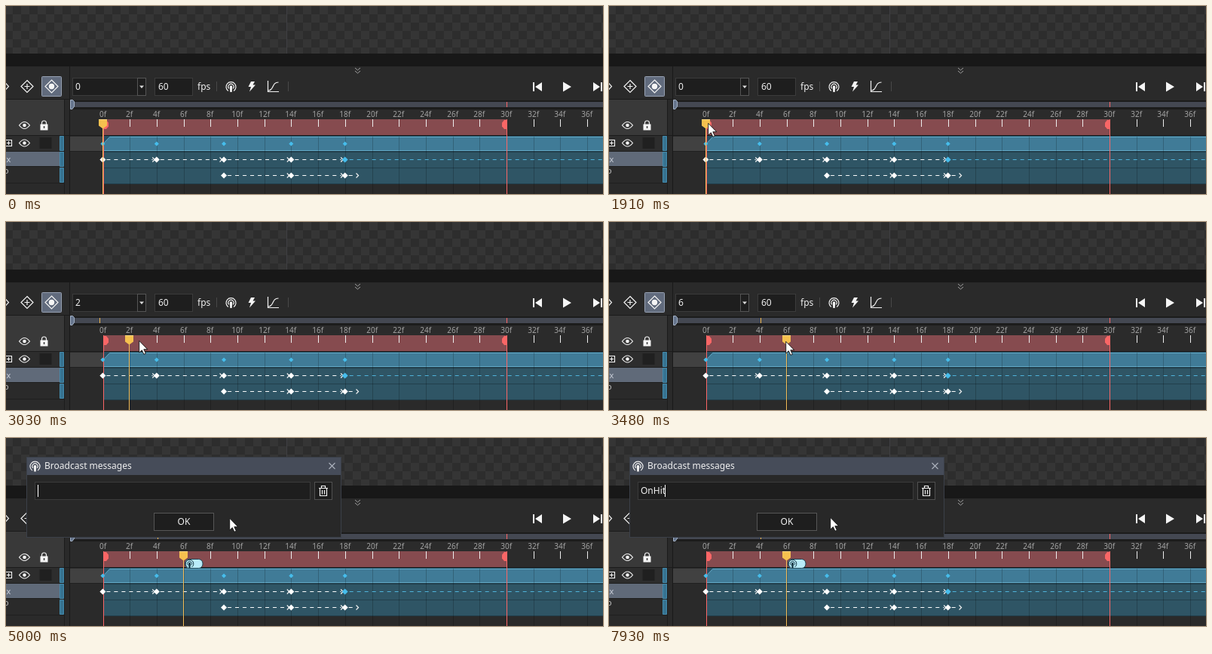
An HTML page for the animation above (8000 ms loop, 792x249 px).

```html
<!DOCTYPE html>
<html lang="en">
<head>
<meta charset="utf-8">
<title>Timeline broadcast</title>
<style>
  html, body { margin: 0; width: 100%; height: 100%; overflow: hidden; background: #2a2a2a; }
  svg { display: block; width: 792px; height: 249px; }
  text { font: 12px "Noto Sans", "Open Sans", sans-serif; fill: #f0f0f0; white-space: pre; }
  .ruler text { font-size: 10px; fill: #a2a2a2; text-anchor: middle; }
  .line { fill: none; stroke: #f2f2f2; stroke-width: 1.2; }
  .box { fill: #1e1e1e; stroke: #3b3b3b; }
</style>
</head>
<body>
<svg viewBox="0 0 792 249" xmlns="http://www.w3.org/2000/svg">
  <defs>
    <pattern id="checker" x="372" width="22" height="22" patternUnits="userSpaceOnUse">
      <path fill="#2d2d2d" d="M0 0h22v22H0z"/>
      <path fill="#353535" d="M0 0h11v11H0zM11 11h11v11H11z"/>
    </pattern>
    <g id="eye">
      <path class="line" d="M-7 0Q0-9 7 0Q0 9-7 0Z"/>
      <circle r="2.3" fill="#f2f2f2"/>
    </g>
    <g id="cast" fill="none" stroke="currentColor" stroke-width="1.2">
      <path d="M-3.6 5.5A6.5 6.5 0 1 1 3.6 5.5M-2.6 2.4A3.6 3.6 0 1 1 2.6 2.4"/>
      <path fill="currentColor" stroke="none" d="M-1.7 0a1.7 1.7 0 1 1 3.4 0l-.5 7h-2.4z"/>
    </g>
    <path id="limit" fill="#fa6666" d="M0 151h4l3 3.5v5L4 163H0z"/>
  </defs>

  <!-- canvas and toolbar -->
  <rect width="792" height="63" fill="url(#checker)"/>
  <path d="M372.5 0v63" stroke="#3f3f43"/>
  <rect y="63" width="792" height="17" fill="#181818"/>
  <rect y="80" width="792" height="45" fill="#2a2a2a"/>
  <path d="M463 82l3.5 3 3.5-3M463 86l3.5 3 3.5-3" fill="none" stroke="#a0a0a0"/>
  <path class="line" d="M-3 99.500l6.500 7-6.500 7M28 98.500l8 8-8 8-8-8zM28 103v7M24.500 106.500h7"/>
  <rect x="47.500" y="93.500" width="26" height="26" rx="1" fill="#616b7d" stroke="#97a1b2"/>
  <path class="line" d="M60.500 98l8.500 8.500-8.500 8.500-8.500-8.500z"/>
  <circle cx="60.500" cy="106.500" r="3.700" fill="#f5f5f5"/>
  <path d="M84.500 80v169" stroke="#191919"/>
  <rect class="box" x="88.500" y="95.500" width="86" height="23"/>
  <rect class="box" x="174.500" y="95.500" width="11" height="23" style="stroke:#555"/>
  <path d="M177 105.500h6l-3 3.500z" fill="#ddd"/>
  <rect class="box" x="197.500" y="95.500" width="50" height="23"/>
  <text id="count" x="92" y="111">0</text>
  <text x="202" y="111">60</text>
  <text x="254" y="111">fps</text>
  <path d="M279.500 100v13M374.500 100v13" stroke="#484848"/>
  <rect id="hover" x="286.500" y="96.500" width="23" height="21" fill="#3b3f48" stroke="#555c69"/>
  <use href="#cast" x="298.500" y="107" color="#f2f2f2"/>
  <path fill="#f5f5f5" d="M325 100h5l-2.500 4.500h3.500l-8 9 2-6.500h-3.500z"/>
  <path class="line" d="M347.500 99v14.500H362M348 112C356 112 352 101 361.500 101"/>
  <path fill="#f5f5f5" d="M699 101h2v12h-2zM711 101v12l-9-6zM739 100.500l11 6.500-11 6.500zM779 101l9 6-9 6zM789 101h2v12h-2z"/>

  <!-- layer list -->
  <rect y="124" width="77" height="48" fill="#393939"/>
  <path d="M0 123.500h84M0 171.500h84" stroke="#1b1b1b"/>
  <rect y="172" width="77" height="20" fill="#2d2d2d"/>
  <rect y="193" width="77" height="19" fill="#606a79"/>
  <path d="M0 192.500h77M0 212.500h77M0 234.500h77" stroke="#1f1f1f"/>
  <path d="M71.500 172.500h5v19h-5zM71.500 193.500h5v19h-5zM71.500 214.500h5v19h-5z" fill="#377391" stroke="#438aac"/>
  <path d="M77.500 124v125" stroke="#1c1c1c"/>
  <use href="#eye" x="24.500" y="158"/>
  <use href="#eye" x="24.500" y="181.500"/>
  <path class="line" d="M47.500 157v-2a3 3 0 0 1 6 0v2"/>
  <path fill="#f5f5f5" fill-rule="evenodd" d="M45.500 156.500h10v8h-10zM49.800 159v3h1.500v-3z"/>
  <path class="line" d="M-1 177.500h8.500v8H-1M3.500 179v5M1 181.500h5"/>
  <rect x="44.500" y="174" width="16" height="15" fill="#202020"/>
  <text x="-6" y="207" style="font-size:11px;fill:#c9ced8">ox</text>
  <text x="-3" y="222" style="font-size:11px;fill:#c0c0c0">o</text>

  <!-- time line -->
  <rect x="85" y="125" width="707" height="12" fill="#1c1c1c"/>
  <rect x="87" y="127" width="705" height="7" fill="#444852"/>
  <path d="M664.500 127v7" stroke="#fa6666"/>
  <path id="tick" d="M.5 127v7" stroke="#efb64c"/>
  <path d="M85.500 124.500h3l2 2v6.500l-2.500 3.500h-2.500z" fill="#66758d" stroke="#a3b1c4"/>
  <rect x="85" y="137" width="707" height="35" fill="#2b2b2b"/>
  <rect x="129" y="150" width="535" height="21" fill="#864b4f"/>
  <path d="M85 171.500h707" stroke="#1b1b1b"/>
  <rect x="85" y="173" width="44" height="19" fill="#414141"/>
  <path d="M85 192.500h44" stroke="#202020"/>
  <path d="M129 172h663v63H129z" fill="#2f5565"/>
  <path d="M129 172h663v21H129z" fill="#285064"/>
  <path d="M129.500 191.500V182L137.500 173.500H793v18z" fill="#407b97" stroke="#62a9c6"/>
  <path d="M129 193h663" stroke="#223f4c" stroke-width="2"/>
  <path d="M129 214.500h663M129 235.500h663" stroke="#223f4c"/>
  <g id="ruler" class="ruler"></g>
  <path d="M129.500 150v99M664.500 150v99" stroke="#fa6666"/>
  <use href="#limit" x="129"/>
  <use href="#limit" transform="translate(665)scale(-1 1)"/>
  <g id="keys"></g>
  <g id="marker">
    <rect x="237.500" y="160.500" width="23.500" height="12" rx="5.500" fill="#b9ecfa" stroke="#1d4352"/>
    <use href="#cast" color="#12313d" transform="translate(243.500 166.500)scale(.82)"/>
  </g>
  <g id="head">
    <path d="M.5 160v89" stroke="#f3bd58"/>
    <path d="M-5 150H6v8.500L.5 162.500-5 158.500z" fill="#f6c14f"/>
    <path d="M-5 150H6v1H-5z" fill="#ffd67f"/>
  </g>

  <!-- dialog -->
  <g id="dialog">
    <rect x="27" y="25" width="418" height="107" fill="#282828"/>
    <rect x="27" y="25" width="418" height="24" fill="#464c59"/>
    <rect x="27.500" y="25.500" width="417" height="106" fill="none" stroke="#3b4049"/>
    <use href="#cast" x="38.500" y="37.500" color="#f2f2f2"/>
    <text x="51" y="41">Broadcast messages</text>
    <path d="M428.500 33l8 8M436.500 33l-8 8" stroke="#a9afba" stroke-width="1.200"/>
    <rect class="box" x="38.500" y="58.500" width="365" height="23"/>
    <rect class="box" x="409.500" y="58.500" width="23" height="23" style="stroke:#505050"/>
    <path class="line" d="M415 66.500h12M418.500 66v-2.500h5V66M416.500 67v9.500h9V67M419.500 69v5.500M422.500 69v5.500"/>
    <rect class="box" x="196.500" y="99.500" width="79" height="23" style="stroke:#565656"/>
    <text x="236" y="115" text-anchor="middle">OK</text>
    <text id="typed" x="42" y="74"></text>
    <path id="caret" d="M.5 62v16" stroke="#fff"/>
  </g>

  <path id="mouse" d="M-.3.3v15.700l3.600-3.300 2.600 5.600 2.500-1.100-2.600-5.500h5z" fill="#fff" stroke="#111" stroke-width=".9"/>
</svg>
<script>
  const LOOP = 8000, STEP = 90, START = 129, UNIT = 17.85;
  const el = id => document.getElementById(id);
  const frameX = f => Math.floor(START + f * UNIT);
  const show = (id, on) => el(id).setAttribute('visibility', on ? 'visible' : 'hidden');
  const move = (id, x, y = 0) => el(id).setAttribute('transform', `translate(${x} ${y})`);
  const reached = (times, t) => times.filter(k => t >= k).length;

  function buildRuler() {
    let out = '';
    for (let f = 0; f <= 36; f += 2) {
      const x = frameX(f);
      out += `<path d="M${x + .5} 150v10" stroke="#eee"/>`;
      out += `<path d="M${x + .5} 173v76" stroke="#000" opacity=".2"/>`;
      out += `<text x="${x - .3}" y="147">${f}f</text>`;
    }
    el('ruler').innerHTML = out;
  }

  function buildKeys() {
    const keyX = f => START - .6 + f * UNIT;
    const diamond = (f, y, r, fill) =>
      `<path fill="${fill}" d="M${keyX(f)} ${y - r}l${r} ${r}-${r} ${r}-${r}-${r}z"/>`;
    const dashes = (a, b, y, color) =>
      `<path d="M${a} ${y}H${b}" stroke="${color}" stroke-dasharray="5 5"/>`;
    const arrow = (x, y) =>
      `<path class="line" d="M${x - 3} ${y - 3}l3 3-3 3"/>`;
    const blue = '#46bdec', white = '#fff';
    const track = (list, y) => list.map((f, i) => i
      ? dashes(keyX(list[i - 1]) + 5, keyX(f) - 5, y, white) + arrow(keyX(f) - 2.5, y) : '').join('');

    const main = [0, 4, 9, 14, 18], sub = [9, 14, 18];
    let out = main.map(f => diamond(f, 182.5, 3, blue)).join('');
    out += dashes(keyX(18) + 6, 792, 203.5, '#4fb3da') + track(main, 203.5);
    out += main.map(f => diamond(f, 203.5, 4, f === 18 ? blue : white)).join('');
    out += track(sub, 224.5) + sub.map(f => diamond(f, 224.5, 4, white)).join('');
    out += dashes(keyX(18) + 5, keyX(19) - 4, 224.5, white) + arrow(keyX(19), 224.5);
    el('keys').innerHTML = out;
  }

  // time, x, y of the mouse pointer
  const path = [
    [1280, 120, 240], [1550, 126, 194], [1910, 132, 155], [2000, 133, 154], [2060, 132, 153],
    [2150, 129, 153], [2330, 128, 153], [2420, 127, 153], [2580, 127, 153], [3030, 177, 157],
    [3390, 228, 158], [3480, 235, 158], [3660, 242, 158], [3850, 242, 158], [3940, 242, 159],
    [4040, 242, 159], [4490, 293, 118], [4640, 297, 108], [4730, 297, 106], [5340, 297, 106],
    [5610, 294, 105]
  ];

  function pointer(t) {
    const i = reached(path.map(p => p[0]), t) - 1;
    const a = path[Math.max(i, 0)], b = path[i + 1] || a;
    const held = Math.floor((t - a[0]) / STEP) * STEP;
    const k = b === a ? 0 : held / (b[0] - a[0]);
    return [1, 2].map(n => Math.round(a[n] + (b[n] - a[n]) * k));
  }

  const scrub = [2760, 2940, 3120, 3210, 3300, 3390];
  const strokes = [6630, 7090, 7560, 7740, 7930];
  const blinks = [5000, 5520, 5980, 6540, 6630];
  const WORD = 'OnHit';

  function draw(t) {
    const [x, y] = pointer(t);
    show('mouse', t >= 1280);
    move('mouse', x, y);

    const f = reached(scrub, t);
    el('count').textContent = f;
    move('head', frameX(f) - 1);
    show('tick', f > 0);
    move('tick', Math.round(86 + f * 19.2));

    const open = t >= 4910;
    show('hover', t >= 4580 && !open);
    show('marker', open);
    show('dialog', open);

    const typed = el('typed');
    const text = WORD.slice(0, reached(strokes, t));
    if (typed.textContent !== text) typed.textContent = text;
    move('caret', text ? Math.floor(42 + typed.getComputedTextLength() - .5) : 42);
    show('caret', open && reached(blinks, t) % 2);
  }

  buildRuler();
  buildKeys();
  draw(0);
  const begin = performance.now();
  (function tick() {
    draw((performance.now() - begin) % LOOP);
    requestAnimationFrame(tick);
  })();
</script>
</body>
</html>
```
